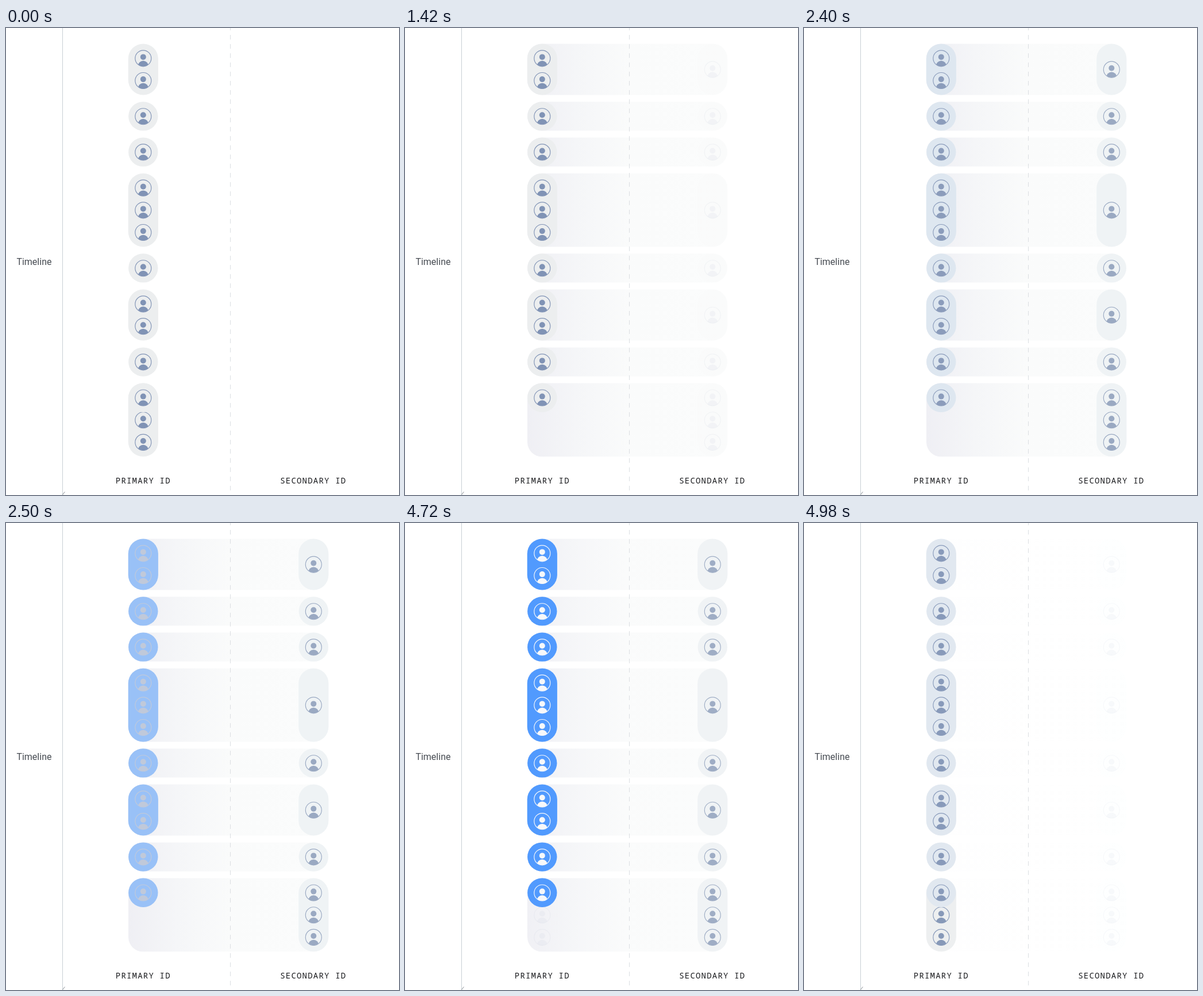
These frames come from a looping animation (684x812 px, 5000 ms). An HTML page with a canvas:

```html
<!DOCTYPE html>
<html lang="en">
<head>
<meta charset="utf-8">
<title>Primary and secondary IDs</title>
<style>
  html, body { margin: 0; width: 100%; height: 100%; overflow: hidden; background: #fff; }
  canvas { display: block; width: 684px; height: 812px; }
</style>
</head>
<body>
<canvas id="stage" width="684" height="812"></canvas>
<script>
const ctx = document.getElementById('stage').getContext('2d');
const LOOP = 5000, TICK = 20;
const LEFT_X = 238.8, RIGHT_X = 535.3;
const ICON_STEP = 38.7, GROUP_STEP = 62.2, FIRST_Y = 52.8;

const GRAY = [236, 238, 239], BLUE = [70, 148, 255];
const SLATE = [128, 147, 181], WHITE = [255, 255, 255];
const PALE = 'rgb(239,243,245)', PALE_SLATE = 'rgb(154,169,194)';

// Each group lists the icon centres of its left-hand pill.
let nextY = FIRST_Y;
const groups = [2, 1, 1, 3, 1, 2, 1, 3].map(count => {
  const ys = Array.from({ length: count }, (_, i) => nextY + i * ICON_STEP);
  nextY = ys[count - 1] + GROUP_STEP;
  return ys;
});
const lastGroup = groups[groups.length - 1];

const ramp = (t, from, to) => Math.min(1, Math.max(0, (t - from) / (to - from)));
const mix = (a, b, p) => `rgb(${a.map((v, i) => Math.round(v + (b[i] - v) * p))})`;

const bandFill = ctx.createLinearGradient(213, 0, 561, 0);
bandFill.addColorStop(0, '#efeff4');
bandFill.addColorStop(0.25, '#f5f6f8');
bandFill.addColorStop(0.51, '#fafbfb');
bandFill.addColorStop(1, '#fbfcfc');

function roundBox(x, y, w, h, r, fill) {
  ctx.fillStyle = fill;
  ctx.beginPath();
  ctx.roundRect(x, y, w, h, r);
  ctx.fill();
}

function pill(x, ys, fill) {
  const half = ys.length > 1 ? 26.1 : 25.7;
  const top = ys[0] - 25.4;
  roundBox(x - half, top, half * 2, ys[ys.length - 1] + 24.9 - top, half, fill);
}

function icon(x, y, color) {
  ctx.fillStyle = ctx.strokeStyle = color;
  ctx.lineWidth = 1.15;
  ctx.save();
  ctx.beginPath();
  ctx.arc(x, y, 14, 0, Math.PI * 2);
  ctx.stroke();
  ctx.clip();
  ctx.beginPath();
  ctx.arc(x, y - 2.4, 5, 0, Math.PI * 2);
  ctx.fill();
  ctx.beginPath();
  ctx.arc(x, y + 13.5, 9.2, 0, Math.PI * 2);
  ctx.fill();
  ctx.restore();
}

function line(x1, y1, x2, y2, color, dash = []) {
  ctx.strokeStyle = color;
  ctx.lineWidth = 1;
  ctx.setLineDash(dash);
  ctx.beginPath();
  ctx.moveTo(x1, y1);
  ctx.lineTo(x2, y2);
  ctx.stroke();
  ctx.setLineDash([]);
}

function label(text, x, y, font, color, spacing = 0) {
  ctx.font = font;
  ctx.fillStyle = color;
  ctx.letterSpacing = spacing + 'px';
  ctx.fillText(text, x, y);
}

function drawBands(alpha) {
  ctx.globalAlpha = alpha;
  for (const ys of groups) {
    const top = ys[0] - 25.4;
    roundBox(213, top, 348, ys[ys.length - 1] + 24.9 - top, 25.2, bandFill);
  }
  ctx.globalAlpha = 1;
}

function drawPrimary(split, active) {
  const pillColor = mix(GRAY, BLUE, active);
  const iconColor = mix(SLATE, WHITE, active);

  ctx.globalAlpha = 1 - split;
  pill(LEFT_X, lastGroup, mix(GRAY, GRAY, 0));
  for (const y of lastGroup.slice(1)) icon(LEFT_X, y, mix(SLATE, SLATE, 0));
  ctx.globalAlpha = 1;

  for (const ys of groups) {
    const kept = ys === lastGroup ? ys.slice(0, 1) : ys;
    pill(LEFT_X, kept, pillColor);
    for (const y of kept) icon(LEFT_X, y, iconColor);
  }
}

function drawSecondary(alpha) {
  ctx.globalAlpha = alpha;
  for (const ys of groups) {
    pill(RIGHT_X, ys, PALE);
    const middle = (ys[0] + ys[ys.length - 1]) / 2;
    for (const y of ys === lastGroup ? ys : [middle]) icon(RIGHT_X, y, PALE_SLATE);
  }
  ctx.globalAlpha = 1;
}

function draw(t) {
  const remain = 1 - ramp(t, 4700, 5000);
  const split = ramp(t, 380, 620) * remain;

  ctx.fillStyle = '#fff';
  ctx.fillRect(0, 0, 684, 812);
  drawBands(split);
  line(390.5, -4, 390.5, 812, '#dcdfe2', [8, 8]);
  drawPrimary(split, ramp(t, 2380, 2620) * remain);
  drawSecondary(ramp(t, 1400, 1620) * remain);

  line(98.5, 0, 98.5, 812, '#c8d0d4');
  line(98.5, 811.5, 102.3, 806.5, '#858c91');
  label('Timeline', 18.4, 412, '16px Roboto, sans-serif', '#464b52');
  const mono = '500 14px "Noto Sans Mono", monospace';
  label('PRIMARY ID', 190.8, 792, mono, '#1c1d20', 1.2);
  label('SECONDARY ID', 477.2, 792, mono, '#1c1d20', 1.2);
}

const start = performance.now();
function frame() {
  const t = (performance.now() - start) % LOOP;
  draw(Math.floor(t / TICK) * TICK);
  requestAnimationFrame(frame);
}
frame();
</script>
</body>
</html>
```
